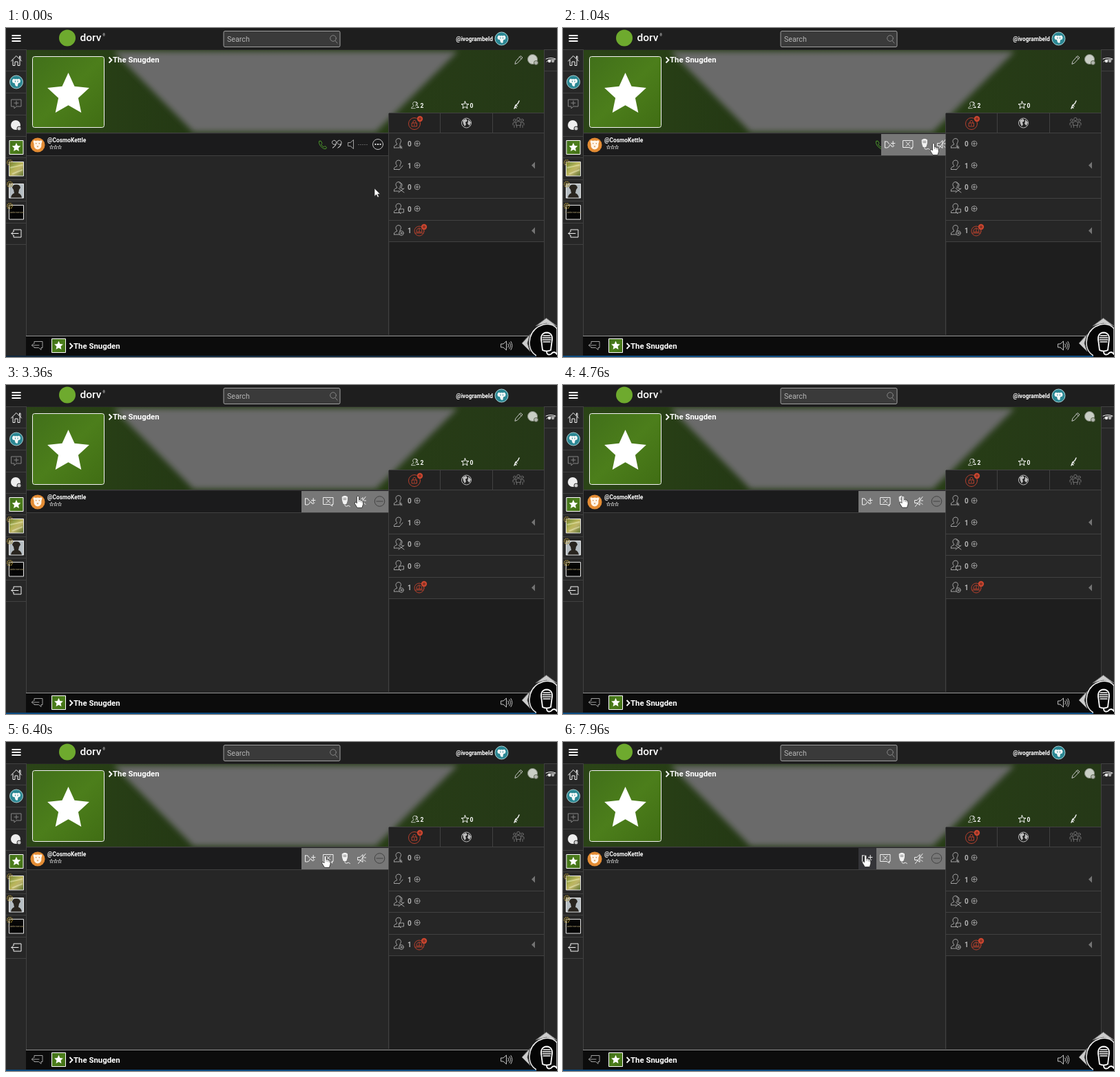
These frames come from a looping animation (800 by 478 pixels, 8000 ms). An HTML page:

```html
<!DOCTYPE html>
<html lang="en">
<head>
<meta charset="utf-8">
<title>Chat room</title>
<style>
html, body { margin: 0; width: 100%; height: 100%; overflow: hidden; background: #262626; }
svg { display: block; width: 100%; height: 100%; }
text { font-family: Roboto, sans-serif; fill: #fff; }
.b { font-weight: 700; }
.line { fill: none; stroke: #c4c4c4; stroke-width: 1; stroke-linecap: round; stroke-linejoin: round; }
.dim { stroke: #858585; }
.mid { stroke: #a0a0a0; }
.white { stroke: #f2f2f2; }
.red { stroke: #b5402d; }
.rule { stroke: #414141; fill: none; }
.count { font-size: 10px; font-weight: 700; fill: #b4b4b4; }
.stat { font-size: 8.5px; font-weight: 700; }
</style>
</head>
<body>
<svg viewBox="0 0 800 478">
<defs>
  <linearGradient id="green" x1="0" y1="0" x2="1" y2="1">
    <stop offset="0" stop-color="#41701a"/><stop offset=".5" stop-color="#4c7e1b"/><stop offset="1" stop-color="#406d14"/>
  </linearGradient>
  <linearGradient id="banner" x1="0" y1="0" x2="1" y2="0">
    <stop offset="0" stop-color="#2b4417"/><stop offset=".3" stop-color="#243914"/><stop offset=".7" stop-color="#273d16"/><stop offset="1" stop-color="#253817"/>
  </linearGradient>
  <linearGradient id="meadow" x1="0" y1="0" x2="1" y2="1">
    <stop offset="0" stop-color="#6d8a3a"/><stop offset=".45" stop-color="#b9b55a"/><stop offset=".6" stop-color="#bdb36a"/><stop offset="1" stop-color="#58702c"/>
  </linearGradient>
  <filter id="soft"><feGaussianBlur stdDeviation="4"/></filter>
  <clipPath id="bannerBox"><path d="M30 32H781V152H30z"/></clipPath>
  <clipPath id="menuBox"><path d="M429 154H555.500V185H429z"/></clipPath>
  <path id="star" fill="#fff" d="M0-32 9-12.300 30.400-9.900 14.400 4.700 18.800 25.900 0 15.200-18.800 25.900-14.400 4.700-30.400-9.900-9-12.300z"/>
  <g id="tile"><path fill="url(#green)" stroke="#fff" d="M-10-10H10V10H-10z"/><use href="#star" transform="scale(.21)"/></g>
  <g id="teal">
    <circle r="9.500" fill="#2b8793" stroke="#a9d0d3"/>
    <path fill="#f4f8f8" d="M-6-2Q-5-6-2-4Q0-5 2-4Q5-6 6-2Q6 2 3 1.500Q2 3 2 6Q0 7-1.500 5L-2.500 1.500Q-6 2-6-2z"/>
    <path fill="#2b8793" d="M-2-2h1v2h-1zM1.500-2h1v2h-1z"/>
  </g>
  <path id="person" d="M-6.500 6V4Q-5.500 2-2.500 1.500V0Q-4.500-2-4-4.500Q-3-7.500 0-7.500Q3-7.500 3.500-4.500Q3.500-2 2 0V1.500M-6.500 6H1"/>
  <path id="exit" d="M-4-3V-5.500H7V5.500H-4V3M3 0H-7M-4-3-7 0-4 3"/>
  <path id="leave" d="M-4-2.500V-5.500H8V3.500H6V6.500L2.500 3.500H-4V2.500M3 0H-7.500M-5-2.500-7.500 0-5 2.500"/>
  <path id="speaker" d="M-5-2.500H-2L2.500-6.500V6.500L-2 2.500H-5z"/>
  <g id="plus" class="line mid"><circle r="3.800"/><path d="M-2 0H2M0-2V2"/></g>
  <path id="chevron" fill="none" stroke="#fff" stroke-width="1.800" d="M0-4 4 0 0 4"/>
  <g id="gear" fill="none" stroke="#a38b37"><circle r="3.700" stroke-width="1.500" stroke-dasharray="1.500 1"/><circle r="1.400"/></g>
  <g id="badge"><circle r="4.200" fill="#c8452f"/><circle r="1.300" fill="none" stroke="#3c1c18" stroke-width=".7"/></g>
</defs>

<path fill="#262626" d="M0 0H800V478H0z"/>
<path fill="#1e1e1e" d="M0 0H800V31H0z"/>
<path fill="#272727" d="M0 31H29V478H0zM781 31H800V478H781z"/>

<!-- top bar -->
<path stroke="#fff" stroke-width="2" d="M8.500 11H21.500M8.500 15H21.500M8.500 19H21.500"/>
<circle cx="89" cy="14.500" r="12" fill="#6eaa2e"/>
<text x="107.500" y="19" font-size="15.500" font-weight="500" fill="#ddd">dorv</text>
<text x="140.500" y="12" font-size="4.500">®</text>
<rect x="316" y="4.500" width="169" height="23" rx="2" fill="#3a3a3a" stroke="#a0a0a0"/>
<text x="321" y="19.500" font-size="10.700" style="fill:#b5b5b5">Search</text>
<g class="line dim"><circle cx="475" cy="15" r="4.300"/><path d="M478 18.500 481 22"/></g>
<text class="b" x="707" y="18.500" font-size="8.300" text-anchor="end">@ivogrambeld</text>
<use href="#teal" x="719.500" y="15.500"/>

<!-- left bar -->
<path class="rule" d="M0 31.500H29M0 62.500H29M0 94.500H29M0 126.500H29M0 157.500H29M0 188.500H29M0 220.500H29M0 251.500H29M0 283.500H29M0 314.500H29"/>
<path class="line white" d="M7.500 48 15 40.500 22.500 48M10 46.500V54.500H13V49H17V54.500H20V46.500M19.500 44V41H21V46"/>
<use href="#teal" x="15" y="78.500"/>
<path class="line dim" d="M8 104H22V114H15L12 117V114H8zM15 106V112M12 109H18"/>
<circle cx="14" cy="141" r="7" fill="#eee"/><circle cx="19" cy="146" r="3" fill="#c9c9c9" stroke="#333"/>
<use href="#tile" x="15" y="173.500"/>
<g stroke="#e5e5e5">
  <path fill="url(#meadow)" d="M4.500 194.500H25.500V215H4.500z"/>
  <path fill="#b5bdc2" d="M4.500 226.500H25.500V247H4.500z"/>
  <path fill="#050505" d="M4.500 257.500H25.500V278H4.500z"/>
</g>
<path stroke="#edf0bd" stroke-width="2" opacity=".5" d="M6 203 24 199M9 212 24 206"/>
<path fill="#29251f" d="M7 246.500Q8 241 12 240L11 235 9 232Q10 227 15 227.500Q20 227 21 232L19 235 18 240Q22 241 23 246.500z"/>
<text x="15" y="269" font-size="4" text-anchor="middle" style="fill:#b9a878">Lanternmoor</text>
<use href="#gear" x="5.500" y="195.500"/><use href="#gear" x="5.500" y="227"/><use href="#gear" x="5.500" y="258.500"/>
<use href="#exit" class="line white" x="15" y="298.500"/>

<!-- banner -->
<g clip-path="url(#bannerBox)">
  <path fill="url(#banner)" d="M30 32H781V152H30z"/>
  <path fill="#6b6b6b" filter="url(#soft)" d="M156 34H656L537 151H272z"/>
</g>
<rect x="38.500" y="41.500" width="104" height="103" rx="3" fill="url(#green)" stroke="#f4f4f4"/>
<use href="#star" x="90.500" y="97"/>
<use href="#chevron" x="149.500" y="46.500"/>
<text class="b" x="155" y="50" font-size="11.400">The Snugden</text>
<path class="line" d="M739 52 740 48.500 747 40.500 750 43 742.500 51zM745.500 42 748.500 45"/>
<circle cx="764.500" cy="45.500" r="7" fill="#c9cec5" stroke="#858b80"/><circle cx="769.500" cy="50.500" r="3" fill="#b1b6ae" stroke="#59614e"/>

<g class="line white">
  <use href="#person" transform="translate(593.500 112.500) scale(.7)"/>
  <path d="M595.500 107.500Q599 108.500 596.500 112L599.500 115.500H596"/>
  <path d="M666.500 106.500 668 110.500H672L669 113 670 117 666.500 114.500 663 117 664 113 661 110.500H665z"/>
  <path stroke-width="1.500" d="M738 117 740 112 743 110 745 106M740 112 742 113.500M739 115 741 116"/>
</g>
<text class="stat" x="601.500" y="115.500">2</text><text class="stat" x="673.500" y="115.500">0</text>

<path fill="#222" d="M556 124H781V152H556z"/>
<path class="rule" d="M556 123.500H781M630.500 124V152M706.500 124V152"/>
<g class="line red">
  <circle cx="593" cy="139" r="8.500"/><path d="M589.500 138H596.500V143H589.500zM591 138V135.500Q593 132.500 595 135.500V138M593 140V141.500"/>
</g>
<use href="#badge" x="601" y="132"/>
<circle cx="668.500" cy="138" r="7" fill="#222" stroke="#bdbdbd"/>
<path fill="#bdbdbd" d="M663 134 668 132 670 135 667 137 668 140 666 143 664 139zM671 133 675 137 673 142 670 139 671 136z"/>
<g class="line" style="stroke:#6c6c6c"><circle cx="744" cy="132.500" r="2.300"/><circle cx="738.500" cy="134" r="1.800"/><circle cx="749.500" cy="134" r="1.800"/>
<path d="M740.500 141V137Q744 134 747.500 137V141zM736 141V138L740 137M752 141V138L748 137M738 141V144.500M741.500 141V144.500M746.500 141V144.500M750 141V144.500"/></g>

<!-- speaker row -->
<path fill="#1b1b1c" d="M30 154H556V185H30z"/>
<path class="rule" d="M29.500 31V447M30 152.500H781M30 185.500H556M555.500 124V446M781.500 31V446M781 62.500H800M781 31.500H800"/>
<circle cx="46" cy="170" r="10.500" fill="#e38c34"/>
<path fill="#fff5e8" d="M39.500 165Q40 162 43 164Q46 163 49 164Q52 162 52.500 165L51.500 168Q52 176 46 176.500Q40 176 40.500 168z"/>
<path fill="#d58b45" d="M43 167h1.300v1.500H43zM47.700 167H49v1.500H47.700zM44.500 171.500H47.500L46 173.500z"/>
<text class="b" x="60" y="166" font-size="8.400">@CosmoKettle</text>
<g id="rating"></g>
<path class="line" style="stroke:#4d9a2b" stroke-width="1.300" d="M455 164.500 457 164 459 167.500 457.500 169Q459 172 461.500 173L463 171.500 465.500 173.500 464.500 175.500Q462 177 457.500 172.500Q453 167 455 164.500z"/>
<g class="line"><path d="M474.500 174Q479 171.500 478.500 168.500A3 3 0 1 1 479.500 166Q480 171 474.500 174zM482 174Q486.500 171.500 486 168.500A3 3 0 1 1 487 166Q487.500 171 482 174z"/>
<use href="#speaker" class="mid" x="502" y="169"/><circle cx="540" cy="169" r="7.500"/></g>
<path stroke="#5c5c5c" stroke-dasharray="2 1" d="M511 169.500H526"/>
<path fill="#ddd" d="M535.500 168h2v2h-2zM539 168h2v2h-2zM542.500 168h2v2h-2z"/>

<!-- user list -->
<path fill="#1e1e1e" d="M557 311H781V446H557z"/>
<path class="rule" d="M556 216.500H781M556 247.500H781M556 279.500H781M556 310.500H781"/>
<g id="people"></g>
<g class="line mid" stroke-width=".9">
  <path d="M573 170.500V175M571 173H575M571 170.500 575 175"/>
  <path d="M571 206 576 200"/>
  <path d="M571 225Q576 225 575 229L573.500 232.500 577 234M570 233 578 239M578 233 570 239"/>
  <path d="M571 263H577.500V268H574.500L572.500 270V268H571z"/>
  <circle cx="574" cy="298" r="3.300"/><circle cx="574" cy="298" r="1"/>
</g>
<path fill="#747474" d="M763 199.500 768 194.500V204.500zM763 294.500 768 289.500V299.500z"/>
<g class="line red"><circle cx="600" cy="295" r="7"/><path d="M594 298H606M596 296Q596 291 600 291Q604 291 604 296zM600 291V296"/></g>
<use href="#badge" x="607" y="289"/>
<path class="line white" stroke-width="1.300" d="M784 45Q791 42 798 45M785 49Q788 45 797 46"/>
<circle cx="789" cy="48" r="2.200" fill="#eee"/><circle cx="794" cy="48" r="2.200" fill="#aaa"/>

<!-- bottom bar -->
<path fill="#0c0c0c" d="M29 447H800V476H29z"/>
<path stroke="#929292" d="M29 447.500H760"/>
<path id="footer" d="M0 476H800V478H0z"/>
<use href="#leave" class="line mid" x="45" y="461"/>
<use href="#tile" x="76.500" y="461.500"/>
<use href="#chevron" x="92.500" y="462"/>
<text class="b" x="98" y="465.500" font-size="11.400">The Snugden</text>
<g class="line"><use href="#speaker" x="724" y="461.500"/><path d="M729 459Q730.500 461.500 729 464M731 457Q734 461.500 731 466M733 455.500Q737 461.500 733 467.500"/></g>
<path fill="#ccc" stroke="#666" d="M769 433 784.500 421.500 800 433 784.500 429zM761 445 749 458 761 470 757 458z"/>
<path fill="#050505" stroke="#eee" stroke-width="1.500" d="M800 476H770Q760 470 760 457Q761 437 780 431Q793 428 800 437z"/>
<path fill="#050505" d="M770 475H800V478H770z"/>
<g fill="none" stroke="#fff" stroke-width="1.800" stroke-linecap="round" stroke-linejoin="round">
  <path d="M777.500 456Q775 443 785 442.500Q795 443 792.500 456L791 468Q785 471 779 468z"/>
  <path stroke-width="1.300" d="M780 447H790M779 450H791M779 453H791M780 456H790"/>
  <path d="M785 470Q785 476 791 474Q796 468 800 474"/>
</g>

<!-- moderation menu -->
<g clip-path="url(#menuBox)"><g id="menu">
  <path fill="#777" d="M429 154H555.500V185H429z"/>
  <path id="firstItem" fill="#343438" d="M429 154H455V185H429z"/>
  <g class="line white" stroke-width="1.300">
    <path d="M434.500 165V174H438Q441 173 441.500 170Q443 168 444 172Q446 174 448 171M434.500 165H438L440.500 168.500M443.500 167.500H449M446.200 164.500V170.500"/>
    <path d="M461 163.500H475V173.500H473L474 176 470 173.500H461zM465 165.500 471 171.500M471 165.500 465 171.500"/>
    <path fill="#f2f2f2" d="M488.500 162.500Q492 160 495.500 162.500V167.500L494 172.500H490L488.500 167.500z"/><path d="M492 173Q491.500 177 495 176Q497.500 174 499.500 176.500"/>
    <path d="M511 167.500H514L518 163.500V174.500L514 171.500H511zM511.500 176.500 522 162.500M520 168H522.500M520 171.500 522 173.500"/>
    <path stroke="#888" d="M490 164.500H494M490 166.500H494"/>
  </g>
  <g fill="none" stroke="#424242"><circle cx="542.500" cy="169" r="7.300"/><path d="M537.500 169H547.500"/></g>
</g></g>

<!-- pointers, both with the tip at the origin -->
<g id="arrow"><path fill="#fff" stroke="#222" stroke-width=".6" d="M0 0V11.500L2.700 9 4.600 13 6.500 12.200 4.700 8.300H8.200z"/></g>
<g id="hand">
  <path fill="#fff" stroke="#222" stroke-width=".8" stroke-linejoin="round" d="M-1.600 1.500Q0-.8 1.500 1.500V6Q3 5 4 6.600Q5.300 5.800 6 7.300Q7.500 7 7.500 9V12.500L6 17.500H-1L-4.700 11.500Q-5 8.800-3 9.500L-1.600 11z"/>
  <path stroke="#666" stroke-width=".7" d="M1.500 6V9M4 7V9.500M6 7.500V10"/>
</g>
</svg>
<script>
const STEP = 40, LOOP = 8000;
const el = id => document.getElementById(id);

el('rating').innerHTML = [66, 72, 78].map(x =>
  `<path class="line mid" stroke-width=".8" transform="translate(${x} 173.200)" d="M0-2.800 .8-.8 2.700-.8 1.200 .6 1.800 2.600 0 1.400-1.800 2.600-1.200 .6-2.700-.8-.8-.8z"/>`).join('');

el('people').innerHTML = [0, 1, 0, 0, 1].map((count, i) => {
  const y = 168 + i * 31.5;
  const plus = i < 4 ? `<use href="#plus" x="597" y="${y}"/>` : '';
  return `<use href="#person" class="line mid" x="570" y="${y}"/><text class="count" x="583" y="${y + 4}">${count}</text>${plus}`;
}).join('');

const smooth = k => k * k * (3 - 2 * k);
const easeOut = k => 1 - (1 - k) ** 2;

// start time, number of steps, end position of the tip, easing
const moves = [
  [40, 10, 538, 167, smooth],
  [1680, 8, 520, 162, smooth],
  [2160, 1, 518.5, 161, smooth],
  [3360, 6, 494, 160.5, easeOut],
  [4760, 13, 467.3, 165, smooth],
  [6320, 13, 439.3, 164, smooth]
];

const progress = (t, start, steps) =>
  Math.max(0, Math.min(1, (Math.floor((t - start) / STEP) + 1) / steps));

function pointerAt(t) {
  let x = 535, y = 233;
  for (const [start, steps, toX, toY, ease] of moves) {
    const k = ease(progress(t, start, steps));
    x += (toX - x) * k;
    y += (toY - y) * k;
  }
  return [x, y];
}

function draw() {
  const t = (performance.now() - begin) % LOOP;
  const [x, y] = pointerAt(t);
  const overButton = y < 177;
  const place = `translate(${x} ${y})`;
  el('arrow').setAttribute('transform', place);
  el('hand').setAttribute('transform', place);
  el('arrow').style.display = overButton ? 'none' : '';
  el('hand').style.display = overButton ? '' : 'none';

  const open = smooth(progress(t, 840, 9));
  el('menu').setAttribute('transform', `translate(${127 * (1 - open)} 0)`);
  el('firstItem').style.display = t >= 7960 ? '' : 'none';
  el('footer').setAttribute('fill', t >= 800 ? '#0b4a80' : '#10283f');
  requestAnimationFrame(draw);
}

const begin = performance.now();
draw();
</script>
</body>
</html>
```
